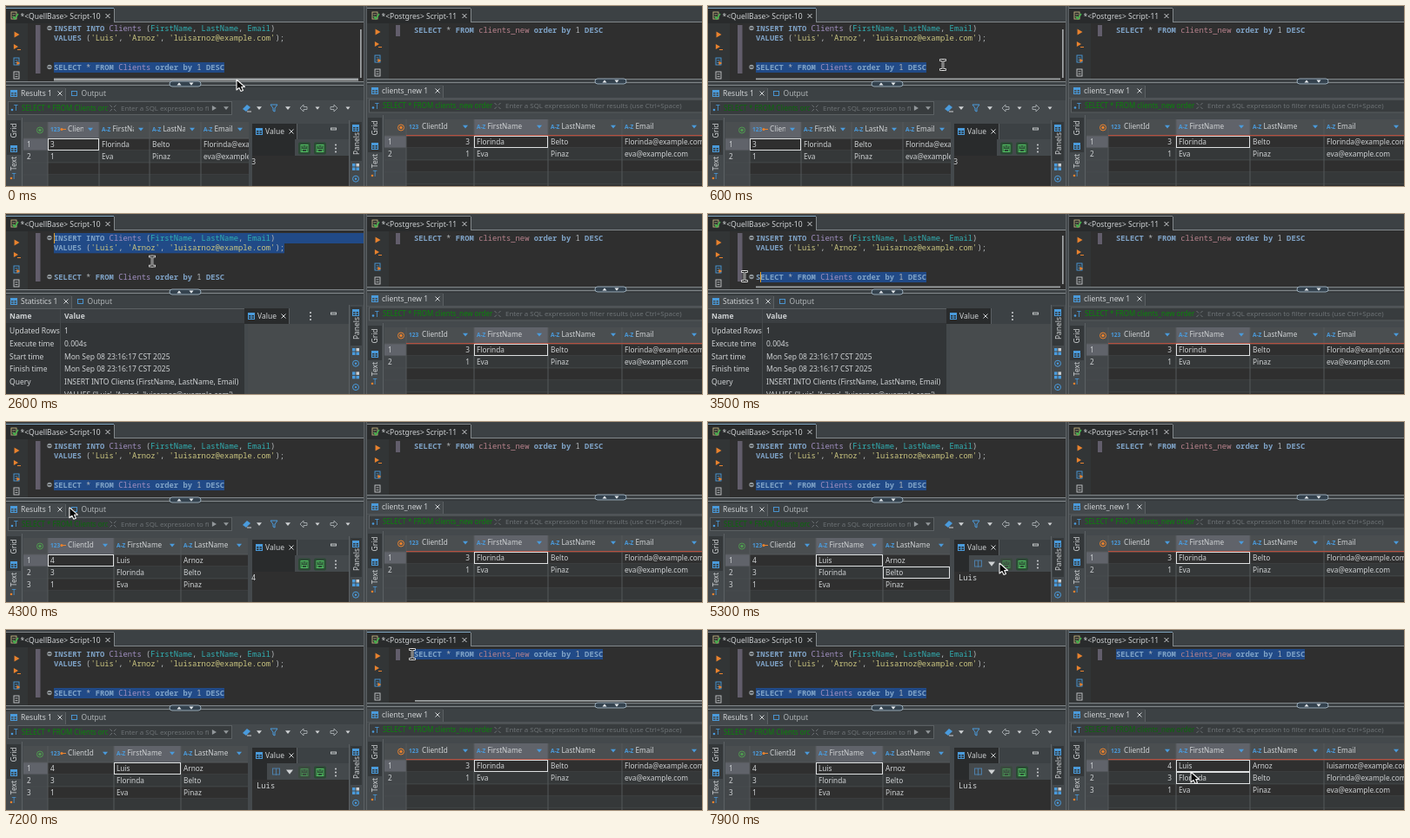
An HTML page with a canvas that plays this animation: 800x208 px, repeating every 8 s.

```html
<!DOCTYPE html>
<html lang="en">
<head>
<meta charset="utf-8">
<title>Query replication</title>
<style>
html, body { margin: 0; width: 100%; height: 100%; overflow: hidden; background: #2f2f2f; }
canvas { display: block; width: 800px; height: 208px; }
</style>
</head>
<body>
<canvas id="stage" width="800" height="208"></canvas>
<script>
const g = document.getElementById('stage').getContext('2d');
const LOOP = 8000, STEP = 100;
const UI = '"Noto Sans", "Open Sans", sans-serif';
const MONO = '"Noto Sans Mono", "DejaVu Sans Mono", monospace';
const CHAR = 5.3;
const C = {
  edit: '#2f2f2f', bar: '#44494c', strip: '#3c4144', line: '#5b6063', rim: '#82888b', head: '#4a4e50', headOn: '#60636a',
  text: '#cfd2d4', dim: '#6d7275', key: '#7fa3c7', table: '#a08fc0', column: '#31b0b3', string: '#cac580',
  bad: '#b7828c', plain: '#b4b8bb', select: '#214a87', orange: '#e8822e', blue: '#4a9bdc', accent: '#4d7ea8',
  scroll: '#a0a4a6'
};

const PEOPLE = {
  1: ['1', 'Eva', 'Pinaz', 'eva@example.com'],
  3: ['3', 'Florinda', 'Belto', 'Florinda@example.com'],
  4: ['4', 'Luis', 'Arnoz', 'luisarnoz@example.com']
};
const OLD = [PEOPLE[3], PEOPLE[1]];
const NEW = [PEOPLE[4], PEOPLE[3], PEOPLE[1]];

// [time, x, y] of the pointer
const PATH = [
  [0, 265, 85], [300, 268, 78], [500, 270, 68], [600, 270, 68], [900, 339, 40], [1000, 341, 41],
  [1200, 341, 41], [1300, 320, 39], [1700, 45, 31], [1800, 36, 29], [2200, 36, 30], [2900, 267, 73],
  [3200, 268, 73], [3300, 252, 73], [3500, 42, 72], [4100, 42, 75], [4800, 150, 158], [5000, 236, 171],
  [5200, 236, 171], [5300, 335, 163], [5500, 400, 130], [6000, 660, 34], [6200, 687, 28], [6600, 467, 28],
  [7200, 467, 28], [7800, 692, 85], [7900, 555, 164]
];

function rect(x, y, w, h, color) {
  g.fillStyle = color;
  g.fillRect(x, y, w, h);
}

function frame(x, y, w, h, color, width = 1) {
  g.strokeStyle = color;
  g.lineWidth = width;
  g.strokeRect(x, y, w, h);
}

function text(s, x, y, { color = C.text, size = 8.5, bold = false, align = 'left', font = UI } = {}) {
  g.font = `${bold ? 'bold ' : ''}${size}px ${font}`;
  g.textAlign = align;
  g.fillStyle = color;
  g.fillText(s, x, y + size * 0.36);
}

function poly(points, color, close = true, width = 1) {
  g.beginPath();
  points.forEach(([x, y], i) => i ? g.lineTo(x, y) : g.moveTo(x, y));
  if (close) { g.closePath(); g.fillStyle = color; g.fill(); }
  else { g.strokeStyle = color; g.lineWidth = width; g.stroke(); }
}

function disc(x, y, r, color) {
  g.beginPath();
  g.arc(x, y, r, 0, Math.PI * 2);
  g.fillStyle = color;
  g.fill();
}

function ring(x, y, r, color) {
  g.beginPath();
  g.arc(x, y, r, 0, Math.PI * 2);
  g.strokeStyle = color;
  g.lineWidth = 1;
  g.stroke();
}

function clip(x, y, w, h, draw) {
  g.save();
  g.beginPath();
  g.rect(x, y, w, h);
  g.clip();
  draw();
  g.restore();
}

function upright(s, x, y, color = C.text) {
  g.save();
  g.translate(x, y);
  g.rotate(-Math.PI / 2);
  text(s, 0, 0, { align: 'center', color });
  g.restore();
}

const down = (x, y, color = C.blue, r = 3) => poly([[x - r, y - r * .6], [x + r, y - r * .6], [x, y + r * .7]], color);
const up = (x, y, color) => poly([[x - 2.5, y + 1.5], [x + 2.5, y + 1.5], [x, y - 1.5]], color);
const play = (x, y, color, r = 3.5) => poly([[x - r * .7, y - r], [x + r, y], [x - r * .7, y + r]], color);

function cross(x, y) {
  poly([[x - 2.5, y - 2.5], [x + 2.5, y + 2.5]], C.text, false);
  poly([[x - 2.5, y + 2.5], [x + 2.5, y - 2.5]], C.text, false);
}

function gridIcon(x, y, color = C.blue) {
  frame(x - 3.5, y - 3.5, 7, 7, color);
  rect(x - 3.5, y - 3.5, 7, 2.5, color);
  rect(x - .5, y - 3, 1, 6, color);
  rect(x - 3, y + .5, 6, 1, color);
}

function docIcon(x, y, color) {
  frame(x - 3, y - 4, 6, 8, color, .9);
  for (let i = 0; i < 2; i++) rect(x - 1.5, y - 1.5 + i * 2.5, 3, .8, color);
}

// Tokens are [string, colour key]; keywords are bold.
function code(tokens, x, y) {
  for (const [s, kind] of tokens) {
    text(s, x, y, { size: 8.83, bold: kind === 'key', color: C[kind], font: MONO });
    x += s.length * CHAR;
  }
}

const select = (table, kind) => [['SELECT ', 'key'], ['* ', 'plain'], ['FROM ', 'key'], [table + ' ', kind],
  ['order by ', 'key'], ['1 ', 'plain'], ['DESC', 'key']];
const INSERT = [['INSERT INTO ', 'key'], ['Clients ', 'table'], ['(', 'plain'], ['FirstName', 'column'], [', ', 'plain'],
  ['LastName', 'column'], [', ', 'plain'], ['Email', 'column'], [')', 'plain']];
const VALUES = [['VALUES ', 'key'], ['(', 'plain'], ["'Luis'", 'string'], [', ', 'plain'], ["'Arnoz'", 'string'],
  [', ', 'plain'], ["'luisarnoz@example.com'", 'string'], [');', 'plain']];

function pointerAt(t) {
  let i = 0;
  while (i < PATH.length - 1 && PATH[i + 1][0] <= t) i++;
  const a = PATH[i], b = PATH[i + 1] || a;
  const k = b === a ? 0 : (t - a[0]) / (b[0] - a[0]);
  return { x: a[1] + (b[1] - a[1]) * k, y: a[2] + (b[2] - a[2]) * k };
}

function editorShell(x, w, bottom, title, tabW, active, dy) {
  rect(x, 0, w, 19, C.strip);
  rect(x, 19, w, bottom - 19, C.edit);
  rect(x, 2, tabW, 18, '#292b2c');
  rect(x, 2, tabW, 1, active ? '#7fa4bf' : C.rim);
  rect(x + tabW, 3, 1, 16, C.rim);
  rect(x + tabW, 18, w - tabW, 1, C.rim);
  docIcon(x + 9, 11, '#c5b783');
  poly([[x + 8, 12], [x + 10, 15], [x + 14, 9]], '#43b64d', false, 1.4);
  text(title, x + 16.5, 11.5);
  cross(x + tabW - 7, 11.5);
  rect(x, 20, 25, bottom - 20, '#323536');
  play(x + 12, 33 + dy, C.orange);
  play(x + 11, 47 + dy, C.orange, 3);
  rect(x + 13, 50 + dy, 4, 1, C.orange);
  docIcon(x + 12, 64 + dy, C.blue);
  play(x + 14, 66 + dy, C.orange, 2.2);
  docIcon(x + 12, 80 + dy, '#c5c8ca');
}

function sash(x, y, w, mid) {
  rect(x, y - 4, w, 6, C.strip);
  rect(x, y - 4, w, 1, C.rim);
  rect(x, y, w, 1, C.rim);
  g.beginPath();
  g.roundRect(mid - 18, y - 4, 36, 6, 3);
  g.fillStyle = '#34424e';
  g.fill();
  g.strokeStyle = '#a3b6c5';
  g.lineWidth = .9;
  g.stroke();
  up(mid - 7, y - 1, '#e8ecef');
  down(mid + 7, y - 1, '#e8ecef', 2.5);
}

function selectBand(from, to, y) {
  rect(from, y - 6, to - from, 12, C.select);
}

function fold(y) {
  disc(50, y, 2.7, '#8f969a');
  rect(48.3, y - .5, 3.4, 1, '#2f2f2f');
}

function leftEditor(t, p) {
  editorShell(0, 411, 89, '*<QuellBase> Script-10', 124, t < 6200, 0);
  const dy = t < 1300 ? -2 : 0;
  const y = [28, 39.3, 73].map(v => v + dy);
  rect(34, 22, 5.5, 56, '#625d6b');
  if (t < 1300 || t >= 3300) {
    const from = t >= 3300 && t < 3600 ? Math.max(t < 3500 ? p.x : 60, 55) : 55;
    selectBand(from, 251, y[2]);
    if (t >= 3300 && t < 4300) rect(from, y[2] - 6, 1, 12, '#e0a030');
  } else if (t < 3200) {
    const top = t >= 1600;
    const from = top && t >= 1800 ? 55 : Math.max(p.x, 55);
    if (top) selectBand(from, 411, y[0]);
    selectBand(top ? 55 : from, 320, y[1]);
    rect(from, y[top ? 0 : 1] - 6, 1, 12, '#e0a030');
  }
  fold(y[0] - .5);
  fold(y[2] - .5);
  code(INSERT, 55, y[0]);
  code(VALUES, 55, y[1]);
  code(select('Clients', 'table'), 55, y[2]);
  if (t < 1700 || t >= 3000 && t < 3900) {
    rect(55, 83.5, 350, t < 500 ? 3 : 1.7, C.scroll);
    rect(407, 25 - dy, 1.7, 56, C.scroll);
  }
}

function rightEditor(t, p) {
  editorShell(415, 385, 85, '*<Postgres> Script-11', 119, t >= 6200, -3);
  rect(448, 22, 5, 13, '#625d6b');
  if (t >= 6300) selectBand(t < 6600 ? Math.max(469, p.x) : 469, 686, 28);
  code(select('clients_new', 'bad'), 469, 28);
  if (t >= 6000 && t < 7700) rect(470, 81, 330, 1.7, C.scroll);
}

function resultTabs(x, y, w, title, tabW, output) {
  rect(x, y, w, 16, C.strip);
  rect(x, y, tabW, 16, C.bar);
  rect(x + tabW, y + 1, 1, 15, C.line);
  gridIcon(x + 9, y + 7);
  text(title, x + 17, y + 7);
  cross(x + tabW - 6, y + 7);
  if (output) {
    frame(x + tabW + 7.5, y + 4.5, 6, 5, C.blue, .9);
    text('Output', x + tabW + 18.5, y + 7, { color: '#aeb3b5' });
  }
  rect(x, y + 15, w, 1, C.line);
}

function filterBar(x, y, w, query, bright, hintX, hintW, boxEnd) {
  rect(x, y - 9, w, 19, C.bar);
  rect(x + 2, y - 7, boxEnd - x - 2, 15, '#383c3e');
  frame(x + 2.5, y - 7.5, boxEnd - x - 3, 15, C.line);
  text('T', x + 9, y, { color: C.blue });
  disc(x + 7, y + 2, 1.3, C.blue);
  clip(x, y - 8, hintX - x - 13, 16, () => text(query, x + 18, y, { size: 8, color: bright ? '#0b850b' : '#0b690b' }));
  const ix = hintX - 7;
  for (const [a, b] of [[-1, -1], [1, -1], [-1, 1], [1, 1]])
    poly([[ix + a, y + b], [ix + a * 3.5, y + b * 3.5]], C.dim, false);
  clip(hintX, y - 8, hintW, 16, () =>
    text('Enter a SQL expression to filter results (use Ctrl+Space)', hintX + 2, y, { size: 7.9, color: C.dim }));
}

function toolbar(y) {
  play(239, y, '#92979a', 3);
  down(253, y, '#92979a');
  poly([[272, y + 1], [277, y - 4], [281, y - 1], [276, y + 4]], C.blue);
  rect(277, y + 3.5, 5, 1, C.text);
  down(291, y, C.text);
  poly([[304, y - 4], [312, y - 4], [309, y], [309, y + 4], [307, y + 3], [307, y], [304, y - 4]], C.blue, false);
  down(324, y, C.text);
  [[342, -1], [377, 1]].forEach(([x, d]) => {
    const arrow = [[-4, -1.5], [0, -1.5], [0, -4], [4, 0], [0, 4], [0, 1.5], [-4, 1.5], [-4, -1.5]];
    poly(arrow.map(([a, b]) => [x + a * d, y + b]), '#a9aeb1', false, .9);
    down(x + 16, y, C.text, 2.5);
  });
}

// edges: column borders, starting with the row-number column
function table({ edges, top, rows, sel, hover, rightId, bottom = 208 }) {
  const names = ['ClientId', 'FirstName', 'LastName', 'Email'];
  const end = edges[edges.length - 1], first = edges[0], body = top + 19;
  rect(first, top, end - first, bottom - top, C.edit);
  rect(first, top, end - first, 19, C.head);
  rect(first, body, edges[1] - first, bottom - body, '#43474a');
  ring(first + 19, top + 9.5, 3.5, rightId ? C.orange : '#4f9a4f');
  disc(first + 19, top + 9.5, 1.7, rightId ? C.orange : '#4f9a4f');
  for (let r = 0, y = body; y < bottom; r++, y += 14) {
    if (r % 2) rect(edges[1], y, end - edges[1], 14, '#353839');
    if (r === 0) rect(first, y, edges[1] - first, 14, C.headOn);
    if (r < rows.length) text(String(r + 1), first + 4, y + 7, { size: 8.2 });
    rect(first, y + 13.5, end - first, .8, '#484c4e');
  }
  for (let c = 0; c < edges.length - 2; c++) {
    const x = edges[c + 1], w = edges[c + 2] - x;
    if (c === sel) rect(x, top, w, 19, C.headOn);
    clip(x, top, w, bottom - top, () => {
      const tx = c ? x + 15.5 : x + (rightId ? 18 : 23), y = top + 8.5;
      text(c ? 'A-Z' : '123', x + 3, y, { size: 6.5, color: C.blue, bold: true });
      if (!c && !rightId) {
        disc(x + 16, y, 1.6, C.orange);
        rect(x + 17, y - .5, 4, 1, C.orange);
      }
      clip(x, top, w - 18, 19, () => text(names[c], tx, y, { size: 8.2 }));
      down(edges[c + 2] - 10, y, C.blue);
      rows.forEach((row, r) => {
        const right = rightId && !c;
        text(row[c], right ? x + w - 5 : x + 3, body + 7 + r * 14, { size: 8.3, align: right ? 'right' : 'left' });
      });
    });
    rect(x - .5, top, 1, bottom - top, '#54595b');
  }
  rect(first, body - .5, end - first, 1, '#54585a');
  if (rightId) rect(edges[1], body - 1, end - edges[1], 1.2, '#b5503f');
  const box = (c, r) => frame(edges[c + 1] + .5, body + r * 14 + .5, edges[c + 2] - edges[c + 1] - 1, 13, '#dfe1e2');
  box(sel, 0);
  if (hover) box(...hover);
}

function sideTabs(x, y, h) {
  rect(x, y, 19, h, C.bar);
  rect(x + 1, y + 3, 16, 40, '#34383a');
  upright('Grid', x + 9, y + 15);
  gridIcon(x + 9, y + 36);
  upright('Text', x + 9, y + 53);
  text('T', x + 9, y + 68, { align: 'center', color: C.blue });
  disc(x + 6, y + 70, 1.3, C.orange);
  rect(x + 18, y, 1, h, C.line);
}

function panelStrip(y) {
  rect(394, y - 26, 17, 234 - y, C.bar);
  rect(394, y - 26, 1, 234 - y, C.line);
  rect(396, y - 24, 13, 45, '#34383a');
  gridIcon(402, y - 17);
  upright('Panels', 402.5, y + 1);
  for (let i = 0, iy = y + 28; iy < 206; i++, iy += 13.7) {
    if (i % 2) {
      ring(402, iy, 3.5, C.blue);
      disc(402, iy, 1.2, C.blue);
    } else {
      for (const [a, b] of [[-4, -4], [.5, -4], [-4, .5], [.5, .5]])
        rect(402 + a, iy + b, 3.5, 3.5, a > 0 && b < 0 ? '#c9cdd0' : C.blue);
    }
  }
}

function valueTab(x, y) {
  rect(x, y - 9, 394 - x, 18, C.strip);
  rect(x, y - 9, 51, 18, '#292b2c');
  gridIcon(x + 8, y);
  text('Value', x + 15, y);
  cross(x + 45, y);
  rect(x + 51, y - 9, 1, 18, C.line);
  frame(373.5, y - 4, 6, 2, C.text, .9);
}

function saveIcon(x, y, on) {
  g.beginPath();
  g.roundRect(x - 7, y - 7, 14, 14, 2);
  g.fillStyle = on ? '#2b4a34' : '#3a4a3e';
  g.fill();
  const color = on ? '#54c565' : '#4a8f55';
  frame(x - 4, y - 4, 8, 8, color, .9);
  frame(x - 2, y - 4, 4, 2.5, color, .7);
  frame(x - 2.5, y + 1, 5, 3, color, .7);
}

function dots(x, y) {
  for (const d of [-4, 0, 4]) disc(x, y + d, 1, C.text);
}

function valuePanel(value, wide) {
  rect(279, 128, 4, 80, C.bar);
  rect(283, 136, 111, 72, C.edit);
  valueTab(283, 145);
  const barX = wide ? 300 : 332;
  rect(283, 154, barX - 283, 19, '#292b2c');
  rect(barX, 154, 394 - barX, 19, C.bar);
  if (wide) {
    frame(306.5, 160, 8, 7, C.accent);
    rect(310, 160, 1, 8, C.accent);
    down(326, 164, C.text, 4);
  }
  saveIcon(343, 164.5, !wide);
  saveIcon(361, 164.5, true);
  dots(379, 164.5);
  text(value, wide ? 288 : 282, 180, { font: MONO, size: 8.83 });
}

function statistics() {
  resultTabs(0, 94, 411, 'Statistics 1', 75, true);
  rect(0, 110, 275, 98, '#323537');
  rect(0, 110, 275, 16, '#3b3f42');
  rect(62, 110, 1, 98, '#45494b');
  text('Name', 4, 117.5, { bold: true });
  text('Value', 67, 117.5, { bold: true });
  const stamp = 'Mon Sep 08 23:16:17 CST 2025';
  [['Updated Rows', '1'], ['Execute time', '0.004s'], ['Start time', stamp], ['Finish time', stamp],
    ['Query', 'INSERT INTO Clients (FirstName, LastName, Email)'],
    ['', "VALUES ('Luis', 'Arnoz', 'luisarnoz@example.com')"]].forEach(([name, value], i) => {
    const y = 135.3 + i * 14.7;
    text(name, 4, y);
    clip(63, 110, 212, 98, () => text(value, 67, y));
  });
  rect(274, 110, 4, 98, C.bar);
  rect(278, 110, 116, 98, '#474b4d');
  valueTab(274, 118);
  dots(350, 118);
  panelStrip(131);
}

function leftResults(t) {
  rect(0, 94, 411, 114, C.bar);
  if (t >= 2300 && t < 3900) return statistics();
  const fresh = t >= 3900;
  resultTabs(0, 94, 411, 'Results 1', 68, true);
  filterBar(0, 118, 411, 'SELECT * FROM Clients order by 1 DESC', t < 500 || t >= 5800, 130, 104, 260);
  toolbar(118);
  sideTabs(0, 129, 79);
  const clicked = t >= 4800;
  table({
    edges: fresh ? [20, 48, 124, 201, 278] : [20, 48, 107, 165, 224, 279],
    top: 134, rows: fresh ? NEW : OLD,
    sel: clicked ? 1 : 0,
    hover: t >= 5000 && t < 5700 ? [2, 1] : null
  });
  valuePanel(clicked ? 'Luis' : fresh ? '4' : '3', clicked);
  panelStrip(158);
}

function rightResults(t) {
  rect(415, 91, 385, 117, C.bar);
  resultTabs(415, 91, 385, 'clients_new 1', 87, false);
  filterBar(415, 115.5, 385, 'SELECT * FROM clients_new order by 1 DESC', t < 7300, 572, 228, 802);
  sideTabs(415, 126, 82);
  table({
    edges: [435, 460, 538, 623, 708, 801], top: 131, rows: t >= 7300 ? NEW : OLD,
    sel: 1, rightId: true, hover: t >= 7900 ? [1, 1] : null
  });
}

function pointer({ x, y }) {
  const beam = y > 19 && (x > 26 && x < 411 && y < 82 || x > 441 && y < 80);
  if (beam) {
    const shape = (color, width) => {
      for (const d of [-5.5, 5.5]) poly([[x - 2.5, y + d], [x + 2.5, y + d]], color, false, width);
      poly([[x, y - 5.5], [x, y + 5.5]], color, false, width);
    };
    g.lineCap = 'square';
    shape('#f4f4f4', 2.6);
    shape('#101010', 1);
    g.lineCap = 'butt';
    return;
  }
  const tip = [[0, 0], [0, 12], [3, 9.5], [5, 13.5], [7.5, 12.5], [5.7, 8.5], [9.5, 8.5]].map(([a, b]) => [x + a, y + b]);
  g.lineJoin = 'round';
  poly(tip, '#080808');
  poly([...tip, tip[0]], '#f4f4f4', false, 1.1);
  g.lineJoin = 'miter';
}

function draw(t) {
  const p = pointerAt(t);
  rect(0, 0, 800, 208, '#34383a');
  clip(0, 0, 411, 208, () => {
    leftEditor(t, p);
    leftResults(t);
    sash(0, 91, 411, 206);
  });
  clip(415, 0, 385, 208, () => {
    rightEditor(t, p);
    rightResults(t);
    sash(415, 88, 385, 695);
  });
  rect(411, 0, 4, 208, C.bar);
  rect(411, 0, 1, 208, C.line);
  rect(414, 0, 1, 208, C.line);
  pointer(p);
}

const start = performance.now();
function tick() {
  const t = (performance.now() - start) % LOOP;
  draw(Math.floor(t / STEP) * STEP);
  requestAnimationFrame(tick);
}
tick();
</script>
</body>
</html>
```
